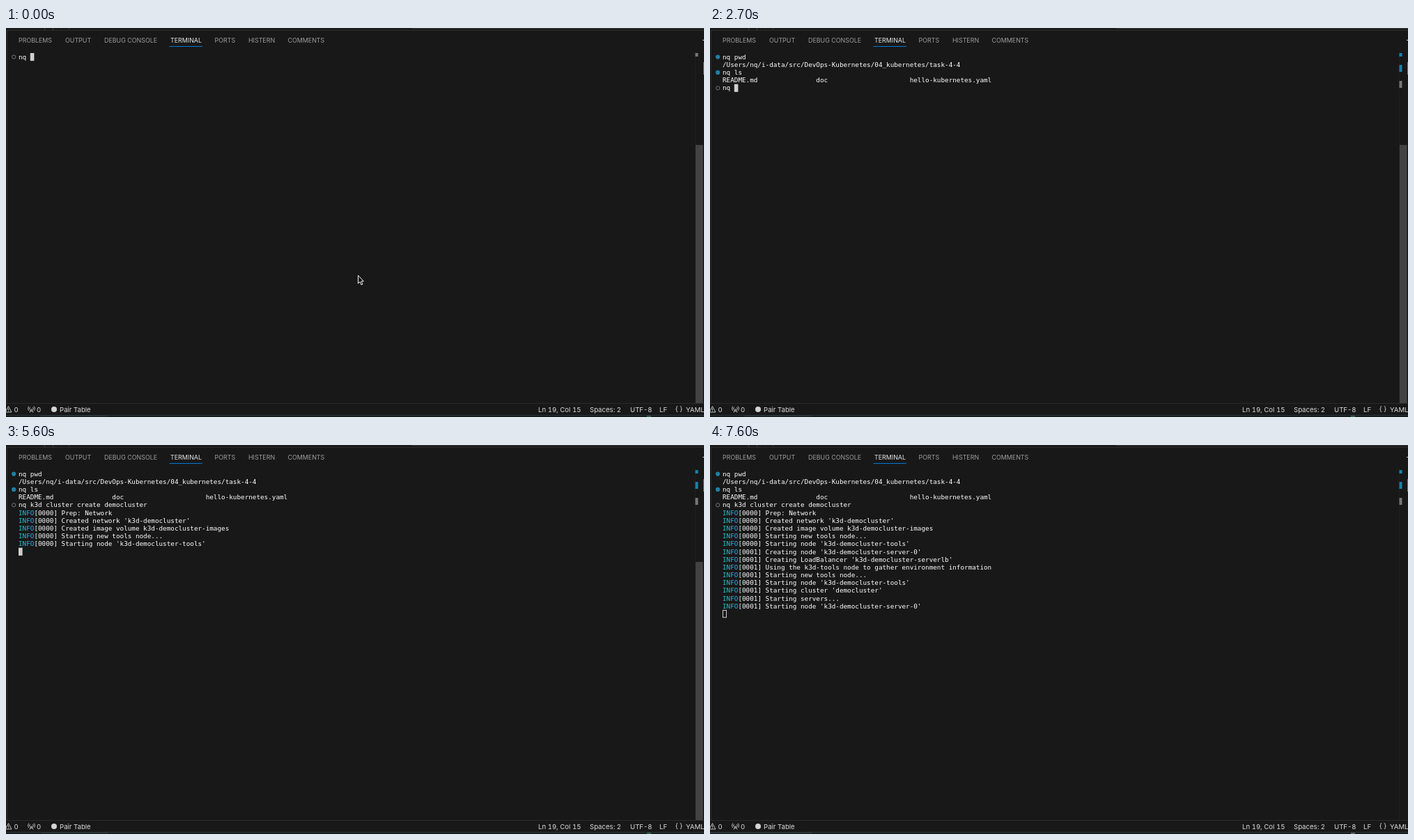
These frames come from a looping animation (1002 px wide and 559 px high, 8 s). An HTML page:

```html
<!DOCTYPE html>
<html lang="en">
<head>
<meta charset="utf-8">
<title>Terminal session</title>
<style>
  html, body { margin: 0; width: 100%; height: 100%; overflow: hidden; background: #181818; }
  svg { display: block; width: 1002px; height: 559px; }
  text { white-space: pre; }
  .tabs { font: 8.9px Inter, sans-serif; fill: #9d9d9d; }
  .status { font: 9.6px Inter, sans-serif; font-variant-numeric: tabular-nums; fill: #dcdcdc; }
  .icon { fill: none; stroke: #d4d4d4; stroke-width: .9; }
  #term { font: 9.3px "DejaVu Sans Mono", monospace; fill: #fff; }
</style>
</head>
<body>
<svg viewBox="0 0 1002 559">
  <rect width="1002" height="559" fill="#181818"/>

  <!-- panel edges -->
  <rect width="1002" height="3" fill="#1b1b1b"/>
  <path d="M55.5 0v3M67.5 0v3M79.5 0v1M90.5 0v2" stroke="#3c3c3c"/>
  <rect x="583" width="419" height="1" fill="#363636"/>
  <rect y="3" width="1002" height="1" fill="#2b2b2b"/>
  <rect x="1" y="3" width="1" height="536" fill="#2b2b2b"/>
  <rect y="539" width="1002" height="1" fill="#2b2b2b"/>
  <rect y="556" width="1002" height="1" fill="#28343a"/>
  <rect y="557" width="1002" height="2" fill="#171a1b"/>
  <rect id="strip" x="50" y="557" width="96" height="1" fill="#28343a"/>
  <rect id="chip" x="920" y="557" width="6" height="2" fill="#2f5a3c"/>

  <!-- scrollbar -->
  <rect x="989" y="34" width="1" height="505" fill="#202020"/>
  <rect id="thumb" x="990" y="168" width="10.5" height="371" fill="#434343"/>
  <rect x="1001" y="49" width="1" height="18" fill="#777"/>
  <rect x="1000" y="17" width="2" height="1" fill="#c8c8c8"/>

  <g class="tabs">
    <text x="18" y="21.2">PROBLEMS</text>
    <text x="85" y="21.2">OUTPUT</text>
    <text x="141" y="21.2">DEBUG CONSOLE</text>
    <text x="236" y="21.2" fill="#e7e7e7">TERMINAL</text>
    <text x="299.5" y="21.2">PORTS</text>
    <text x="348" y="21.2">HISTERN</text>
    <text x="404.5" y="21.2">COMMENTS</text>
  </g>
  <rect x="234.5" y="26" width="47.5" height="1" fill="#0078d4"/>

  <g class="status">
    <text x="11.5" y="551.5">0</text>
    <text x="44" y="551.5">0</text>
    <text x="77" y="551.5">Pair Table</text>
    <text x="764" y="551.5">Ln 19, Col 15</text>
    <text x="838" y="551.5">Spaces: 2</text>
    <text x="896" y="551.5">UTF-8</text>
    <text x="938" y="551.5">LF</text>
    <text x="961" y="551">{ }</text>
    <text x="976" y="551.5">YAML</text>
  </g>
  <g class="icon">
    <path d="M-1 552L3.5 543.7L8 552ZM3.5 546.5v2.8M3.5 550.1v.9"/>
    <path d="M36.5 547.5L34 552.5M36.5 547.5L39 552.5M35.2 550.5h2.6M34.6 548.7a2.4 2.4 0 0 1 0-3.6M38.4 548.7a2.4 2.4 0 0 0 0-3.6M33 550a4.5 4.5 0 0 1 0-6.4M40 550a4.5 4.5 0 0 0 0-6.4"/>
  </g>
  <circle cx="69" cy="548" r="4" fill="#d4d4d4"/>

  <g id="term"></g>
  <path id="mouse" d="M505.5 355.5v11.6l2.6-2.4l1.9 4.3l1.9-.8l-1.9-4.2h3.4z" fill="#111" stroke="#f4f4f4" stroke-linejoin="round"/>
</svg>

<script>
const LOOP = 8000, LEFT = 18, TOP = 36, CELL = 5.6, ROW = 11.17;
const BLUR = 6600, FADE = 800; // window loses focus, then the scrollbar fades
const PROMPT = 'nq ', PASTED = 'k3d cluster create democluster ';
const BLUE = '#1b81a8', GRAY = '#777', CYAN = '#29b8db', BLOCK = '#d0d0d0';

const info = (sec, msg) => `INFO[000${sec}] ${msg}`;
const lines = [
  PROMPT + 'pwd',
  '/Users/nq/i-data/src/DevOps-Kubernetes/04_kubernetes/task-4-4',
  PROMPT + 'ls',
  'README.md'.padEnd(24) + 'doc'.padEnd(24) + 'hello-kubernetes.yaml',
  PROMPT + PASTED,
  info(0, 'Prep: Network'),
  info(0, "Created network 'k3d-democluster'"),
  info(0, 'Created image volume k3d-democluster-images'),
  info(0, 'Starting new tools node...'),
  info(0, "Starting node 'k3d-democluster-tools'"),
  info(1, "Creating node 'k3d-democluster-server-0'"),
  info(1, "Creating LoadBalancer 'k3d-democluster-serverlb'"),
  info(1, 'Using the k3d-tools node to gather environment information'),
  info(1, 'Starting new tools node...'),
  info(1, "Starting node 'k3d-democluster-tools'"),
  info(1, "Starting cluster 'democluster'"),
  info(1, 'Starting servers...'),
  info(1, "Starting node 'k3d-democluster-server-0'"),
];

// [time, finished lines, input after the prompt (none while a command runs)]
const steps = [
  [0, 0, ''], [500, 0, 'p'], [900, 0, 'pw'], [1000, 0, 'pwd'],
  [1500, 1], [1600, 2], [1700, 2, ''], [2200, 2, 'l'], [2400, 2, 'ls'],
  [2500, 3], [2600, 4], [2700, 4, ''], [3300, 4, PASTED],
  [4600, 5], [4700, 6], [4800, 8], [4900, 10],
  [5900, 12], [6000, 13], [6100, 14], [6200, 15], [6400, 17], [6500, 18], [BLUR, 18],
];

// command rows: row, time of the prompt, time of completion, ruler mark
const commands = [
  { row: 0, from: 0, done: 1700, y: 36, h: 5 },
  { row: 2, from: 1700, done: 2700, y: 53, h: 10 },
  { row: 4, from: 2700, done: Infinity, y: 76, h: 10 },
];

const $ = id => document.getElementById(id);
const rowTop = row => TOP + row * ROW;
const colX = col => LEFT + col * CELL;
const box = (x, y, w, h, fill) => `<rect x="${x}" y="${y}" width="${w}" height="${h}" fill="${fill}"/>`;
const write = (str, row, col = 0, fill = '') =>
  `<text x="${colX(col)}" y="${rowTop(row) + 8.8}"${fill && ` fill="${fill}"`}>${str}</text>`;

function printLine(str, row) {
  return str.startsWith('INFO')
    ? write('INFO', row, 0, CYAN) + write(str.slice(4), row, 4)
    : write(str, row);
}

function mark(cmd, time) {
  const done = time >= cmd.done, cy = rowTop(cmd.row) + 5.6;
  const dot = done
    ? `<circle cx="11.2" cy="${cy}" r="3.1" fill="${BLUE}"/>`
    : `<circle cx="11.2" cy="${cy}" r="2.6" fill="none" stroke="${GRAY}"/>`;
  return dot + box(989.5, cmd.y, 4, cmd.h, done ? BLUE : GRAY);
}

function cursor(row, col, focused) {
  const x = colX(col), y = rowTop(row);
  return focused
    ? box(x, y, CELL, ROW, BLOCK)
    : `<rect x="${x + .5}" y="${y + .5}" width="${CELL - .6}" height="${ROW - 1}" fill="none" stroke="${BLOCK}"/>`;
}

function draw([time, count, input]) {
  const focused = time < BLUR;
  let out = lines.slice(0, count).map(printLine).join('');
  let col = 0;
  if (input !== undefined) {
    const pasted = input === PASTED, start = PROMPT.length;
    // the cursor sits on the trailing blank of a paste
    col = start + input.trimEnd().length;
    out += write(PROMPT, count);
    if (pasted) out += box(colX(start), rowTop(count), input.length * CELL, ROW, BLOCK);
    out += write(input, count, start, pasted ? '#181818' : '');
  }
  out += cursor(count, col, focused);
  out += commands.filter(c => time >= c.from).map(c => mark(c, time)).join('');
  $('term').innerHTML = out;
  $('mouse').style.display = time < 500 ? '' : 'none';
  $('strip').setAttribute('x', focused ? 50 : 0);
  $('strip').setAttribute('width', focused ? 96 : 146);
  $('chip').setAttribute('fill', focused ? '#2f5a3c' : '#5a5a5a');
}

let shown;
function tick() {
  const t = performance.now() % LOOP;
  const step = steps.findLast(s => s[0] <= t);
  if (step !== shown) draw(shown = step);
  $('thumb').style.opacity = Math.min(1, Math.max(0, 1 - (t - BLUR) / FADE));
  requestAnimationFrame(tick);
}
tick();
</script>
</body>
</html>
```
